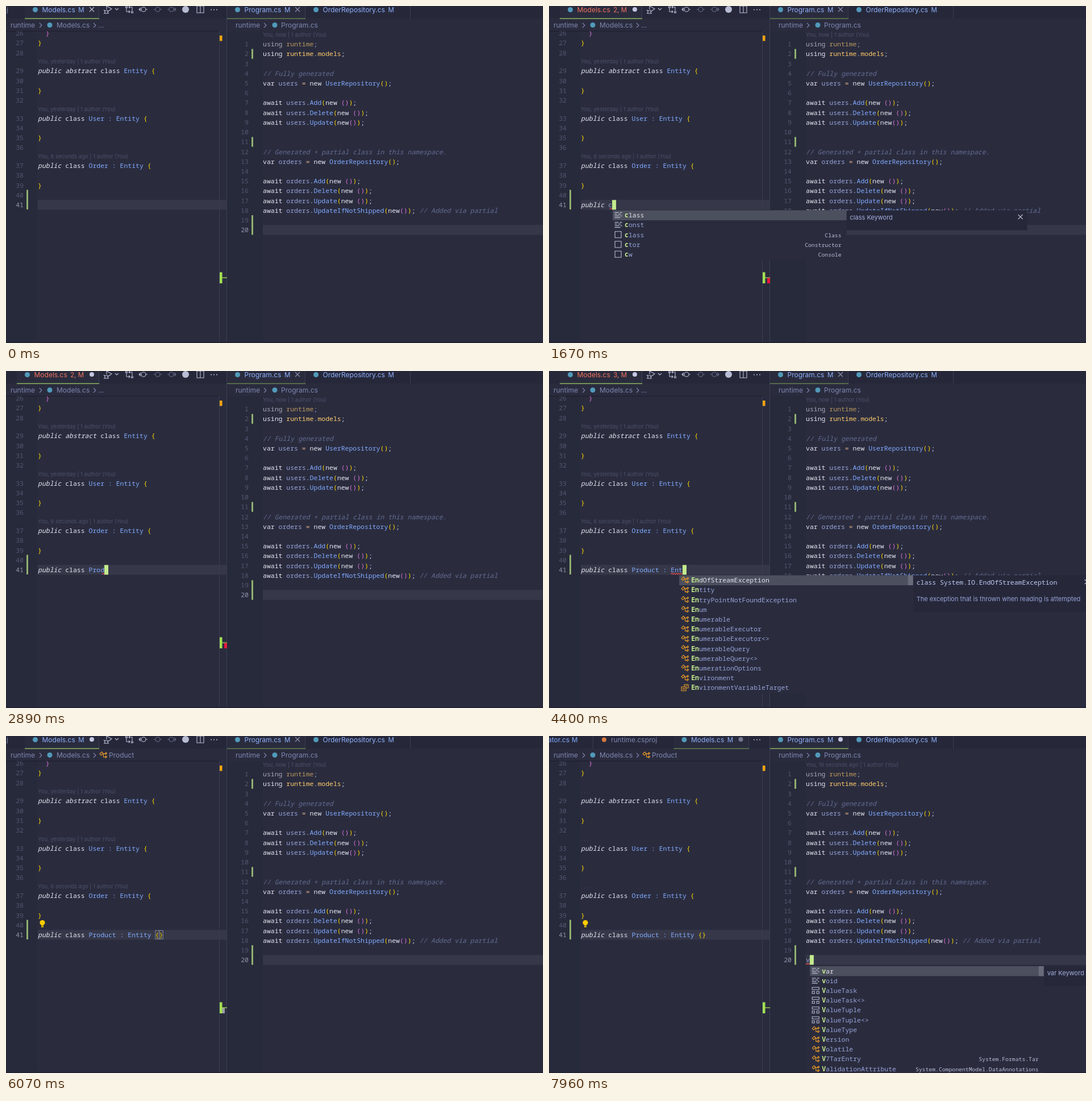
An HTML page with a canvas that plays this animation: 945x593 px, repeating every 8 s.

```html
<!DOCTYPE html>
<html lang="en">
<head>
<meta charset="utf-8">
<title>Editor typing</title>
<style>
  html, body { margin: 0; width: 100%; height: 100%; overflow: hidden; background: #2a2c3e; }
  canvas { display: block; }
</style>
</head>
<body>
<canvas id="stage" width="945" height="593"></canvas>
<script>
const ctx = document.getElementById('stage').getContext('2d');
const LOOP = 8000, CHAR = 6.885, LINE = 17.21, LEFT = 56, RIGHT = 452;
const MONO = '"Noto Sans Mono", "DejaVu Sans Mono", monospace';
const UI = 'Inter, Roboto, sans-serif';
const C = {
  editor: '#2a2c3e', gutter: '#272a3a', bar: '#26283a', row: '#363849', border: '#3a3c50',
  white: '#e3e5f0', blue: '#82aaff', soft: '#98a3d8', gold: '#ffd700', orchid: '#da70d6',
  name: '#ffcb6b', comment: '#646b91', lens: '#4c5069', lineNo: '#535872', crumb: '#8087b0',
  lime: '#c3ea8d', added: '#91b072', error: '#f0735f', squiggle: '#e5484d', orange: '#ee9d28',
  file: '#519aba', icon: '#b9bdd3'
};

const leftLines = {
  27: '}', 29: 'public abstract class Entity {', 31: '}',
  33: 'public class User : Entity {', 35: '}',
  37: 'public class Order : Entity {', 39: '}'
};
const rightLines = [
  'using runtime;', 'using runtime.models;', '', '// Fully generated',
  'var users = new UserRepository();', '',
  'await users.Add(new ());', 'await users.Delete(new ());', 'await users.Update(new());', '', '',
  '// Generated + partial class in this namespace.', 'var orders = new OrderRepository();', '',
  'await orders.Add(new ());', 'await orders.Delete(new ());', 'await orders.Update(new ());',
  'await orders.UpdateIfNotShipped(new()); // Added via partial', '', ''
];

// Each suggestion reads "kind label detail".
const lists = {
  pub: { items: ['key public'], doc: 'public Keyword' },
  c: { items: ['key class', 'key const', 'box class Class', 'box ctor Constructor', 'box cw Console'], doc: 'class Keyword' },
  cl: { items: ['key class', 'box class Class'], doc: 'class Keyword' },
  P: { items: ['class Path', 'class Parallel', 'class Program', 'class Progress<>', 'class Predicate<>'], doc: 'class Path', code: true },
  Pr: { items: ['class Program', 'class Progress<>', 'class Predicate<>', 'class PriorityQueue<>'], doc: 'class Program', code: true },
  En: {
    items: ['class EndOfStreamException', 'class Entity', 'class EntryPointNotFoundException', 'class Enum',
      'class Enumerable', 'class EnumerableExecutor', 'class EnumerableExecutor<>', 'class EnumerableQuery',
      'class EnumerableQuery<>', 'class EnumerationOptions', 'class Environment', 'enum EnvironmentVariableTarget'],
    doc: 'class System.IO.EndOfStreamException', code: true, scroll: true,
    body: 'The exception that is thrown when reading is attempted past the end'
  },
  Ent: { items: ['class Entity', 'class EntryPointNotFoundException'], doc: 'class runtime.models.Entity', code: true },
  v: {
    items: ['key var', 'key void', 'struct ValueTask', 'struct ValueTask<>', 'struct ValueTuple', 'struct ValueTuple<>',
      'class ValueType', 'class Version', 'class Volatile', 'class V7TarEntry System.Formats.Tar',
      'class ValidationAttribute System.ComponentModel.DataAnnotations'],
    doc: 'var Keyword', scroll: true
  }
};

// time, text on line 41, suggestion list, its column, matched letters
const P = 'public class ', Q = P + 'Product';
const typing = [
  [0, ''], [530, 'p'], [620, 'pu'], [710, 'pu', 'pub', 2, 2],
  [1060, 'pub', 'pub', 2, 2], [1140, 'pub', 'pub', 3, 3], [1230, 'publ', 'pub', 4, 4],
  [1320, 'publi', 'pub', 5, 5], [1400, 'public', 'pub', 6, 6], [1490, 'public '],
  [1580, 'public c'], [1660, 'public c', 'c', 8, 1], [1750, 'public cl', 'c', 8, 1],
  [1840, 'public cl', 'cl', 9, 2], [1930, 'public cla', 'cl', 10, 3],
  [2100, 'public clas', 'cl', 10, 3], [2190, 'public clas', 'cl', 11, 4], [2280, 'public class', 'cl', 12, 5],
  [2360, P], [2450, P + 'P'], [2540, P + 'P', 'P', 14, 1], [2620, P + 'Pr', 'Pr', 15, 2],
  [2710, P + 'Pro', 'Pr', 15, 2], [2890, P + 'Prod'], [3070, P + 'Produ'], [3160, P + 'Produc'],
  [3250, Q], [3430, Q + ' '], [4050, Q + ' :'], [4140, Q + ' : '], [4230, Q + ' : E'],
  [4310, Q + ' : En', 'En', 25, 2], [4400, Q + ' : Ent', 'En', 25, 2], [4480, Q + ' : Ent', 'Ent', 26, 3],
  [4570, Q + ' : Enti', 'Ent', 27, 4], [4660, Q + ' : Entit', 'Ent', 28, 5], [4750, Q + ' : Entity', 'Ent', 29, 6],
  [4930, Q + ' : Entity '], [5020, Q + ' : Entity {'], [5190, Q + ' : Entity {}']
];

const icons = {
  key: ['M0 1.5h7M9 1.5h4M0 4.5h4M6 4.5h5M0 7.5h8M10 7.5h3M0 10.5h10', C.icon],
  box: ['M.5 .5h11v11h-11z', C.icon],
  struct: ['M.5 .5h12v4h-12zM.5 7.5h4v4h-4zM8.5 7.5h4v4h-4z', C.icon],
  class: ['M.5 4l3.5-3.5 2.5 2.5-3.5 3.5zM5.5 4h4M7 4v5.5h2.5M9.5 3.5l2-2 1.5 1.5-2 2zM9.5 9.5l2-2 1.5 1.5-2 2z', C.orange],
  enum: ['M5.5 4v-3.5h7v6h-4M.5 4.5h8v7h-8zM2.5 7h4M2.5 9h4M8 2.5h3', C.orange]
};

function rect(color, x, y, w, h) {
  ctx.fillStyle = color;
  ctx.fillRect(x, y, w, h);
}
function text(str, x, y, color, font = `12px ${UI}`, align = 'left') {
  ctx.font = font;
  ctx.textAlign = align;
  ctx.fillStyle = color;
  ctx.fillText(str, x, y + 4.2);
}
function mono(str, x, y, color, style = '500', size = 11.475, align) {
  text(str, x, y, color, `${style} ${size}px ${MONO}`, align);
}
function dot(x, y, r, color) {
  ctx.fillStyle = color;
  ctx.beginPath();
  ctx.arc(x, y, r, 0, 7);
  ctx.fill();
}
function stroke(path, x, y, color, width = 1.1) {
  ctx.save();
  ctx.translate(x, y);
  ctx.strokeStyle = color;
  ctx.lineWidth = width;
  ctx.stroke(new Path2D(path));
  ctx.restore();
}
const cross = (x, y, color) => stroke('M-4 -4L4 4M4 -4L-4 4', x, y, color);
const chevron = x => stroke('M-2 -4L2 0L-2 4', x, 34, C.crumb);

function tokenColor(token) {
  if (token.startsWith('//')) return C.comment;
  if (/^(public|abstract|class|using|var|new|await)$/.test(token)) return C.white;
  if (/^(runtime|models)$/.test(token)) return C.name;
  if (/^[A-Z:]/.test(token)) return C.blue;
  if (/^\w/.test(token)) return C.soft;
  return { '{': C.gold, '}': C.gold, '=': '#e8b48c' }[token] || '#c3cbe6';
}
function code(str, x, y) {
  let col = 0, depth = 0;
  for (const token of str.match(/\/\/.*|\w+|\s+|./g) || []) {
    let color = tokenColor(token);
    if (token === ')') depth--;
    if (/[()]/.test(token)) color = depth % 2 ? C.orchid : C.gold;
    if (token === '(') depth++;
    const italic = /^(public|abstract|\/\/.*)$/.test(token);
    mono(token, x + col * CHAR, y, color, italic ? 'italic 500' : '500');
    col += token.length;
  }
}
function squiggle(from, to, y) {
  let path = `M${from} ${y}`;
  for (let x = from, up = 1; x < to; x += 2, up = -up) path += `l2 ${-2 * up}`;
  stroke(path, 0, 0, C.squiggle);
}
const cursor = (x, y) => rect(C.lime, x, y - 8.5, 7, 17);

const leftY = n => 47.9 + LINE * (n - 26) + 14.6 * ((n > 28) + (n > 32) + (n > 36));
const rightY = n => 67 + LINE * (n - 1);

function popup(x, y, { items, doc, code: isCode, body, scroll }, matched) {
  const width = 411.5, end = x + width;
  rect(C.bar, end, y, body ? 400 : 318, body ? 64 : 35);
  rect(C.editor, x, y, width, items.length * LINE + 1);
  rect('#4c4f5d', x, y, width, 17.5);
  if (scroll) rect('#686b79', end - 9, y, 9, 17.5);
  items.forEach((item, i) => {
    const [kind, label, detail] = item.split(' ');
    const rowY = y + 8.4 + i * LINE;
    stroke(icons[kind][0], x + 3.5, rowY - 6, icons[kind][1]);
    mono(label.slice(0, matched), x + 21, rowY, C.lime, '700');
    mono(label.slice(matched), x + 21 + matched * CHAR, rowY, i ? C.soft : C.white);
    if (detail) mono(detail, end - 9, rowY, C.icon, '400', 9.77, 'right');
  });
  ctx.save();
  ctx.beginPath();
  ctx.rect(end, y, 936 - end > 318 ? 318 : Math.max(936 - end, 75), 70);
  ctx.clip();
  if (isCode) mono(doc, end + 6, y + 12, '#c0cbf5');
  else text(doc, end + 6, y + 12, '#a6afdc', `11px ${UI}`);
  if (body) text(body, end + 6, y + 41, C.soft, `11px ${UI}`);
  ctx.restore();
  cross(end + 306, y + 11.5, C.icon);
}

function tab(x, width, name, status, color, active, focused) {
  rect(active ? C.editor : C.bar, x, 0, width, 22);
  rect(C.border, x + width - 1, 0, 1, 22);
  if (active) rect(focused ? '#9cc862' : '#6b8a50', x, 21.5, width, 1.3);
  dot(x + 18.5, 6.5, 4.5, C.file);
  text(name, x + 30.5, 7, color);
  ctx.font = `12px ${UI}`;
  text(status, x + 36 + ctx.measureText(name).width, 7, color, `11.5px ${UI}`);
}

function toolbar() {
  const bright = C.icon, dim = '#666b86';
  stroke('M-3 -6L6 -1L-1 4M-3 -6V0M-6 2h5v5h-5zM-8 1l2 2M-8 7l2-1M1 7l-2-1', 180, 6, bright);
  stroke('M-3 -1L0 2L3 -1', 195, 5, bright);
  stroke('M-5 -3v7h6M-1 2l2 2-2 2M5 3v-7h-6M1 -6l-2 2 2 2M-6.5 -5h3v2h-3zM3.5 4h3v2h-3z', 217, 6, bright);
  const ring = 'M4 0A4 4 0 1 1 -4 0A4 4 0 1 1 4 0';
  stroke(ring + 'M-4 0h-4M-5 -3l-3 3 3 3M4 0h3', 242, 6, bright);
  stroke(ring + 'M-4 0h-3M4 0h3', 267, 6, dim);
  stroke(ring + 'M-4 0h-3M4 0h4M5 -3l3 3-3 3', 291, 6, dim);
  dot(316, 6, 6, bright);
  stroke('M-6 -6h12v12h-12zM0 -6v12', 342, 6, bright);
}

function tabs(t, leftFocused) {
  rect(C.bar, 0, 0, 945, 22);
  const dirty = t >= 530, failing = t >= 710 && t < 5550;
  if (leftFocused) {
    const start = failing ? 19 : 33;
    if (!failing) text('j', 1, 7, C.crumb);
    const status = failing ? `${t < 4140 ? 2 : 3}, M` : 'M';
    tab(start, 164 - start, 'Models.cs', status, failing ? C.error : '#8fb0fa', true, true);
    if (dirty) dot(151, 6, 4, '#c3c7e2');
    else cross(151, 6, C.icon);
    toolbar();
  } else {
    text('ator.cs', -2, 7, C.blue);
    text('M', 40, 7, C.blue, `11.5px ${UI}`);
    rect(C.border, 77, 0, 1, 22);
    dot(97, 6.5, 4, '#d9793d');
    text('runtime.csproj', 109, 7, C.crumb);
    tab(219.5, 132.5, 'Models.cs', 'M', '#8fb0fa', true, false);
    dot(337.5, 6, 4, '#74788f');
  }
  for (const x of [361, 366, 371]) dot(x, 6.5, 1, C.icon);

  tab(389, 138, 'Program.cs', 'M', '#8fb0fa', true, !leftFocused);
  if (t >= 7870) dot(513, 6, 4, '#c3c7e2');
  else cross(513, 6, '#8d92ac');
  tab(527, 185, 'OrderRepository.cs', 'M', '#8fb0fa', false);
}

function crumbs(t) {
  text('runtime', 8, 34, C.crumb);
  chevron(61);
  dot(77, 33.5, 4.5, C.file);
  text('Models.cs', 89, 34, C.crumb);
  chevron(156);
  if (t < 6070) text('…', 162, 34, C.crumb);
  else {
    stroke(icons.class[0], 164.5, 27.5, C.orange);
    text('Product', 181, 34, C.crumb);
  }
  text('runtime', 404, 34, C.crumb);
  chevron(456);
  dot(473, 33.5, 4.5, C.file);
  text('Program.cs', 484, 34, C.crumb);
}

function ruler(t) {
  rect(C.border, 375, 44, 1, 549);
  rect(C.border, 388, 0, 1, 593);
  rect('#f5a50f', 376, 52, 4.5, 9.5);
  if (t >= 5550 && t < 6510) rect('#9a9ca6', 376, 478, 9, 10);
  rect('#a4e052', 376, 468.5, 4.5, 19.5);
  rect('#a4e052', 376, 477.5, 13, 1.3);
  if (t >= 710 && t < 5550) rect('#e6173f', 384, 478.5, 5, 9.5);
}

function leftEditor(t, typed, focused) {
  const y41 = leftY(41);
  rect(C.row, LEFT, y41 - 8.8, 332, 17.4);
  ctx.save();
  ctx.beginPath();
  ctx.rect(0, 44, 388, 549);
  ctx.clip();
  mono('}', LEFT + 2 * CHAR, leftY(26), C.orchid);
  for (let n = 26; n <= 41; n++) {
    mono(n, 31, leftY(n), n === 41 ? '#9095ad' : C.lineNo, '500', 11.475, 'right');
    code(leftLines[n] || '', LEFT, leftY(n));
  }
  ctx.restore();
  [[97, 'yesterday'], [181, 'yesterday'], [264, '6 seconds ago']].forEach(([y, when]) =>
    text(t < 6340 ? `You, ${when} | 1 author (You)` : '. . .', LEFT, y - .7, C.lens, `9.5px ${UI}`));
  rect(C.added, 36, 323.5, 3, 34.5);

  const end = LEFT + typed.length * CHAR;
  if (t >= 6070 && focused) {
    ctx.strokeStyle = '#878a98';
    for (const back of [2, 1]) ctx.strokeRect(end - back * CHAR + .3, y41 - 7.5, CHAR - .4, 15);
  }
  code(typed, LEFT, y41);
  const word = typed.match(/\S*$/)[0].length;
  if (t >= 710 && t < 1400) squiggle(LEFT, end, y41 + 8);
  else if (t >= 1580 && t < 3430) squiggle(end - 4, end + 1, y41 + 8);
  else if (t >= 4230 && t < 4750) squiggle(end - word * CHAR, end, y41 + 8);
  if (t >= 180 && t < 6070 || t >= 6510 && focused) cursor(end, y41);
  if (t >= 5900) {
    dot(64, 328.5, 4.6, '#ffcc00');
    rect('#ffcc00', 62, 331, 4, 5.5);
    rect(C.editor, 62, 333.7, 4, .8);
  }
}

function rightEditor(t, focused) {
  const y20 = rightY(20);
  rect(C.row, RIGHT, y20 - 8.8, 493, 17.6);
  text(`You, ${t < 7690 ? 'now' : '16 seconds ago'} | 1 author (You)`, RIGHT, 49.5, C.lens, `9.5px ${UI}`);
  rightLines.forEach((line, i) => {
    mono(i + 1, 427, rightY(i + 1), i === 19 ? '#9095ad' : C.lineNo, '500', 11.475, 'right');
    ctx.globalAlpha = i ? 1 : .68;
    code(line, RIGHT, rightY(i + 1));
    ctx.globalAlpha = 1;
  });
  for (const [line, count] of [[2, 1], [11, 1], [19, 2]])
    rect(C.added, 432, rightY(line) - 8.6, 3, count * LINE);

  if (t >= 7870) {
    code('v', RIGHT, y20);
    squiggle(RIGHT, RIGHT + CHAR, y20 + 8);
    cursor(RIGHT + CHAR, y20);
  } else if (focused && t < 7430) cursor(RIGHT, y20);
}

function draw(t) {
  const [, typed, list, column, matched] = typing.findLast(step => step[0] <= t);
  const leftFocused = t < 6770;
  rect(C.editor, 0, 0, 945, 593);
  rect(C.gutter, 0, 44, 55, 549);
  rect(C.gutter, 389, 44, 63, 549);
  tabs(t, leftFocused);
  crumbs(t);
  leftEditor(t, typed, leftFocused);
  rightEditor(t, !leftFocused && t >= 7000);
  rect('rgba(20,21,32,.45)', 0, 43.5, 375, 1.5);
  ruler(t);
  rect('#222434', 0, 591, 945, 2);
  if (list) popup(LEFT + column * CHAR + 1, 359.5, lists[list], matched);
  if (t >= 7960) popup(RIGHT + CHAR + .3, 405, lists.v, 1);
}

const start = performance.now();
(function frame() {
  draw((performance.now() - start) % LOOP);
  requestAnimationFrame(frame);
})();
</script>
</body>
</html>
```
